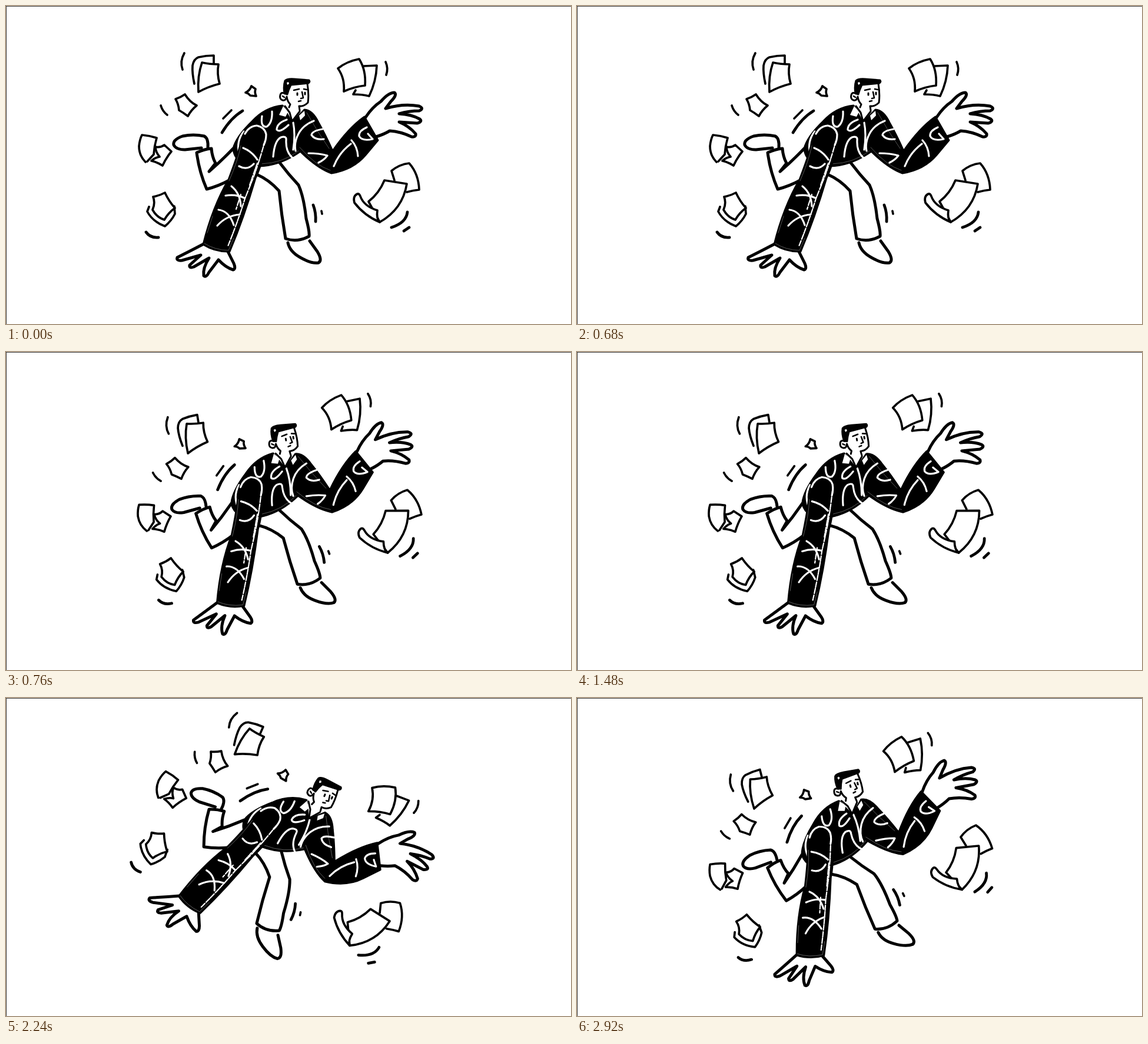
These frames come from a looping animation (960 by 540 pixels, 2960 ms). An HTML page:

```html
<!DOCTYPE html>
<html lang="en">
<head>
<meta charset="utf-8">
<title>Tumbling among papers</title>
<style>
html, body { margin: 0; width: 100%; height: 100%; overflow: hidden; background: #fff; }
svg { display: block; width: 960px; height: 540px; }
path { stroke-linecap: round; stroke-linejoin: round; }
.paper path { fill: #fff; stroke: #000; stroke-width: 3.7; }
.tick path { fill: none; stroke: #000; stroke-width: 3.7; }
.limb path { fill: #fff; stroke: #000; stroke-width: 5; }
.ink path { fill: #000; stroke: #000; stroke-width: 3; }
.print path { fill: none; stroke: #fff; stroke-width: 3.2; }
.grain path { fill: none; stroke: #fff; stroke-width: 2.2; stroke-dasharray: 5 1.5 2 2 7 1 1 3; }
.seam path { fill: none; stroke: #777; stroke-width: .7; }
.face path { fill: none; stroke: #000; stroke-width: 3; }
.blank path { fill: #fff; stroke: none; }
.tick .fat { stroke-width: 4.8; }
.face .fine { stroke-width: 2.5; }
</style>
</head>
<body>
<svg viewBox="0 0 960 540">
  <g id="scene">
    <g class="paper">
      <path d="M320 132Q316 114 317 101Q319 90 327 87Q340 84 353 84L353 97"/>
      <path d="M333 96Q346 99 361 99Q358 115 363 132Q343 137 327 146Q325 119 333 96Z"/>
      <path d="M288 158Q297 155 304 150Q312 163 324 169Q315 176 309 187Q301 181 294 177Q293 166 288 158Z"/>
      <path d="M407 147Q414 144 417 136L424 141Q422 147 425 153L415 152Q412 148 407 147Z"/>
      <path d="M608 102L630 101Q629 128 617 153Q606 150 590 150L594 143"/>
      <path d="M564 106Q579 94 600 90Q612 109 610 135Q592 137 574 145Q576 123 564 106Z"/>
      <path d="M237 265Q226 254 226 238Q227 227 231 219Q244 220 256 224Q252 238 251 252L240 264"/>
      <path d="M254 239Q262 241 269 236L281 247Q272 258 266 271Q257 265 247 263Q254 257 261 256Q254 248 254 239Z"/>
      <path d="M243 341L240 349Q249 366 270 374Q281 365 287 353L286 340"/>
      <path d="M250 324Q261 322 270 317Q277 332 287 343Q276 351 269 363Q256 359 249 346Q254 335 250 324Z"/>
      <path d="M660 296L655 280Q668 269 685 267Q701 285 702 312Q692 313 681 316"/>
      <path d="M643 296Q662 299 681 302Q674 345 635 367L616 332Q634 318 643 296Z"/>
      <path d="M597 319Q589 323 592 334Q609 356 635 367Q629 361 631 347Q608 340 602 323Q600 318 597 319Z"/>
    </g>
    <g class="tick">
      <path d="M303 80Q295 94 300 108"/>
      <path d="M263 169Q266 179 274 185"/>
      <path d="M645 95Q650 106 646 117"/>
      <path class="fat" d="M238 384Q245 394 259 393"/>
      <path class="fat" d="M682 350Q680 368 655 376M685 376L676 382"/>
      <path class="fat" d="M402 178Q382 190 367 215"/>
      <path d="M383 177L369 191"/>
      <path class="fat" d="M522 338Q527 351 526 366"/>
      <path d="M536 348L537 353"/>
    </g>

    <g class="limb">
      <path d="M343 240Q344 225 337 221Q318 217 300 221Q283 227 285 236Q289 244 304 244L332 241"/>
      <path d="M386 242Q367 262 345 281L356 267Q350 256 349 242Q337 243 324 249Q328 281 341 311Q361 306 381 295"/>
      <path d="M479 402Q482 417 500 427Q519 438 531 436Q538 432 529 417L516 399"/>
      <path d="M426 286Q447 295 464 314Q468 355 475 395Q495 402 515 391Q516 383 510 361Q506 324 497 304Q480 286 465 266"/>
      <path d="M611 189Q622 172 637 162Q650 147 660 147Q665 151 654 162L645 174Q675 165 702 170Q711 174 702 178Q685 178 668 183Q689 184 703 192Q708 196 699 199L668 197Q685 204 696 217Q697 223 689 222Q670 213 652 212Q642 218 629 222"/>
      <path d="M336 404Q315 415 291 427Q289 433 299 432L331 423L312 440Q311 446 319 443L345 428Q334 445 336 458Q340 462 345 452L361 431Q373 444 386 448Q391 446 387 437L377 417"/>
    </g>

    <g class="ink">
      <path d="M470 169Q440 172 418 196Q391 222 386 242Q387 256 398 264L430 272Q466 271 500 247Q530 276 553 284Q590 278 611 253L632 228L609 188Q582 207 555 246Q542 217 531 198Q521 177 507 176L486 198Z"/>
    </g>
    <g class="seam">
      <path d="M499 240Q526 271 551 279M434 268Q470 267 497 246M511 181Q528 212 549 242"/>
    </g>
    <g class="print">
      <path d="M435 187Q432 206 443 205Q453 198 452 179"/>
      <path d="M477 193Q460 199 460 210Q465 216 480 202"/>
      <path d="M523 195Q505 202 497 217Q489 232 492 246M488 198Q492 218 488 244"/>
      <path d="M538 209Q520 212 519 219Q525 228 540 226"/>
      <path d="M514 250Q532 250 546 254Q541 261 531 266"/>
      <path d="M454 256Q456 229 467 223Q477 220 476 228Q475 248 487 258"/>
      <path d="M404 213Q391 229 396 250"/>
      <path d="M557 272Q566 249 586 234M587 228Q597 239 598 255"/>
      <path d="M613 206Q599 212 600 221Q605 230 623 226L615 217"/>
    </g>

    <g class="ink">
      <path d="M409 211Q424 201 437 209Q446 218 442 233Q434 272 424 292Q404 360 380 417Q356 418 335 405Q351 341 378 295Q393 256 399 233Q402 217 409 211Z"/>
    </g>
    <g class="print">
      <path d="M406 217Q413 204 426 203Q440 206 442 218Q442 228 438 236"/>
      <path d="M403 241Q418 247 427 261M396 272Q410 280 421 268"/>
      <path d="M373 322Q390 319 405 326M383 306Q398 318 399 340"/>
      <path d="M361 346Q379 348 387 372M359 373Q374 356 397 354"/>
    </g>
    <g class="grain">
      <path d="M440 229Q431 262 420 292L406 327Q395 363 377 408"/>
      <path d="M427 267L414 304M399 320L391 345"/>
    </g>
    <g class="seam">
      <path d="M337 403Q354 414 378 415L387 394M399 237Q394 263 379 297M342 385L351 357"/>
    </g>

    <g class="blank">
      <path d="M479 133L513 131L513 165L499 171L499 177L486 196L474 172L482 166L476 154Z"/>
      <path d="M471 170L464 185L475 188L479 180Z"/>
      <path d="M507 178L498 186L500 194L508 186Z"/>
    </g>
    <g class="face">
      <path d="M512 132Q515 150 513 164Q506 171 498 170L499 177"/>
      <path d="M477 154Q478 162 483 167L481 172"/>
      <path d="M474 149Q468 145 466 151Q464 158 470 160Q475 161 476 156"/>
      <path d="M474 170L482 181L486 196L499 179"/>
      <path d="M495 148L495 151M508 147L508 150"/>
      <path class="fine" d="M470 153L473 155M489 143L498 141M506 141L511 142M503 146L505 156L501 157M497 162L501 161"/>
    </g>
    <g class="ink">
      <path d="M474 127Q477 123 490 124L515 126Q517 129 514 131L484 134Q480 142 478 150L473 148Q471 136 474 127Z"/>
    </g>
    <g class="blank"><path d="M477 130L480 129L481 132L478 134Z"/></g>
  </g>
  <path d="M0 .5H960M.5 0V540" fill="none" stroke="#3c3c3c" stroke-width="1"/>
</svg>
<script>
const scene = document.getElementById("scene");
const angles = [0, -9.2, 23.3, -14.4];
const hold = 760, loop = 2960;
const start = performance.now();

function draw() {
  const t = (performance.now() - start) % loop;
  scene.setAttribute("transform", `rotate(${angles[Math.floor(t / hold)]} 480 270)`);
  requestAnimationFrame(draw);
}
draw();
</script>
</body>
</html>
```
